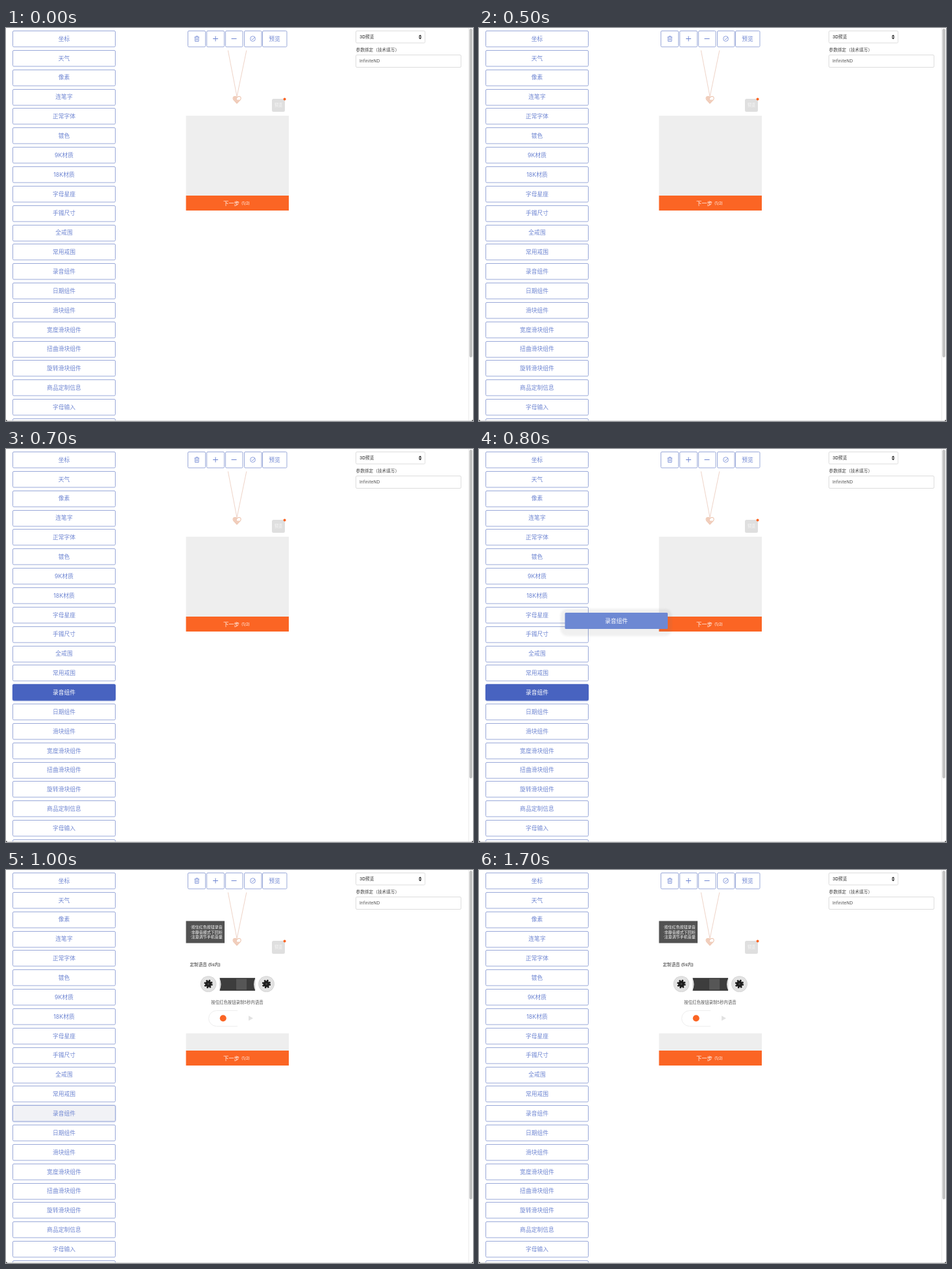
Recreate the animation shown at these times as an HTML page. Size 720x605 px, loop 2 s.

```html
<!DOCTYPE html>
<html lang="zh-CN">
<head>
<meta charset="utf-8">
<style>
  html, body { margin: 0; width: 100%; height: 100%; overflow: hidden; background: #fff; }
  svg { display: block; width: 720px; height: 605px; }
  text { font-family: Inter, "Noto Sans CJK SC", "Noto Sans CJK", sans-serif; }
</style>
</head>
<body>
<svg id="stage" viewBox="0 0 720 605" xmlns="http://www.w3.org/2000/svg"></svg>
<script>
const BLUE = '#6f86d2', BORDER = '#9aa9d9', ORANGE = '#fb6524';
const LABELS = ['坐标', '天气', '像素', '连笔字', '正常字体', '镀色', '9K材质', '18K材质', '字母星座',
  '手镯尺寸', '全戒围', '常用戒围', '录音组件', '日期组件', '滑块组件', '宽度滑块组件', '扭曲滑块组件',
  '旋转滑块组件', '商品定制信息', '字母输入', ''];
const PITCH = 29.85, ACTIVE = 12;

const rect = (x, y, w, h, fill, extra = '') =>
  `<rect x="${x}" y="${y}" width="${w}" height="${h}" fill="${fill}" ${extra}/>`;
const circle = (x, y, r, fill, extra = '') =>
  `<circle cx="${x}" cy="${y}" r="${r}" fill="${fill}" ${extra}/>`;
const path = (d, stroke, extra = '') =>
  `<path d="${d}" fill="none" stroke="${stroke}" ${extra}/>`;
// Text placed by the vertical centre of its line
const text = (s, x, cy, size, fill, anchor = 'middle', extra = '') =>
  `<text x="${x}" y="${cy + size * .37}" font-size="${size}" fill="${fill}" text-anchor="${anchor}" ${extra}>${s}</text>`;
const outlined = (x, y, w, h, stroke = BORDER, extra = '') =>
  rect(x, y, w, h, '#fff', `rx="1.5" stroke="${stroke}" ${extra}`);

function sidebar() {
  return LABELS.map((label, i) => {
    const y = 4.5 + i * PITCH, id = i === ACTIVE;
    return outlined(10.5, Math.floor(y) + .5, 158, 24.5, BORDER, id ? 'id="activeBox"' : '') +
      text(label, 89.5, y + 12, 8.8, BLUE, 'middle', id ? 'id="activeLabel"' : '');
  }).join('');
}

function toolbar() {
  const boxes = [[280.5, 27], [309.5, 27], [338.5, 26.5], [367.5, 26.5], [395.5, 37.5]];
  return boxes.map(([x, w]) => outlined(x, 4.5, w, 24.5)).join('') +
    path('M290.5 14H298M292.8 13.7V12.6H295.8V13.7M291.5 14V20.5H297V14M293.3 15.5V19M295.2 15.5V19', BLUE, 'stroke-width=".8"') +
    path('M319 16.5H327M323 12.5V20.5M347.5 16.5H355.5', BLUE) +
    circle(380.5, 16.5, 3.9, 'none', `stroke="${BLUE}" stroke-width=".8"`) +
    path('M378.7 16.5L380.2 18L383.8 14', BLUE, 'stroke-width=".8"') +
    text('预览', 414, 16.5, 8.8, BLUE);
}

function settings() {
  return outlined(539.5, 4.5, 106.5, 18.5, '#ddd') +
    text('3D预览', 545, 14, 6.7, '#333', 'start', 'font-weight="500"') +
    '<path d="M636 13.2L638.5 10.3L641 13.2ZM636 14.6L638.5 17.5L641 14.6Z" fill="#333"/>' +
    text('参数绑定（技术填写）', 539.5, 34, 6.7, '#444', 'start') +
    outlined(539.5, 41.5, 162, 19, '#ddd') +
    text('InfiniteND', 545, 51, 6.7, '#555', 'start');
}

function windowFrame() {
  return rect(713, 0, 1, 605, '#ececec') + rect(714.5, 1, 4.5, 506, '#c1c1c1', 'rx="2.2"') +
    rect(0, 604, 720, 1, '#ddd') + rect(0, 603.5, 1.5, 1.5, '#333') + rect(718.5, 603.5, 1.5, 1.5, '#333');
}

function necklace() {
  const heart = 'M356 116L350.6 110.3Q349 106.5 352 105.5Q355 105 356.2 107Q357.5 105 360.2 105.5Q363.2 106.5 361.6 110.3Z';
  return path('M342.3 34.5L356 105.5L370.8 34.5', '#eccfc1', 'stroke-width=".9"') +
    `<path d="${heart}" fill="#fff" stroke="#ecc3ad" stroke-width="1.1"/>` +
    '<path d="M350.3 109.5V106.5L353 105.3L356 107V110.5H361L356 115.8Z" fill="#f1cdbb"/>';
}

const badge = () => rect(410, 109, 20, 20, '#dfdfdf', 'rx="2.5"') +
  text('预览', 420, 119, 6.3, '#f7f7f7') + circle(429.6, 109.4, 2, ORANGE);

const nextBar = y => rect(277.5, y, 158.5, 23, ORANGE) +
  text('下一步', 335, y + 11.5, 8.3, '#fff', 'start') +
  text('(1/2)', 363, y + 11.8, 6.1, '#fff', 'start');

const reel = x => circle(x, 175.5, 12.3, 'url(#metal)') +
  circle(x, 175.5, 8.4, '#e9e9e9') + circle(x, 175.5, 5, '#1d1d1d') +
  circle(x, 175.5, 5.6, 'none', 'stroke="#1d1d1d" stroke-width="2.2" stroke-dasharray="2.4 2"') +
  circle(x, 175.5, 1.4, '#444');

function recorder() {
  const tips = ['·按住红色按钮录音', '·非静音模式下回听', '·注意调节手机音量'];
  return rect(277.5, 78.5, 59.5, 34, '#525252') +
    tips.map((s, i) => text(s, 284, 88 + i * 7.4, 6, '#fff', 'start')).join('') +
    text('定制语音 (5s内)', 283.5, 146, 6.6, '#333', 'start', 'font-weight="500"') +
    reel(312) + reel(401.5) +
    rect(329.5, 166.5, 54.5, 19, '#3d3d3d') + rect(355, 167.5, 16, 17, '#565656') +
    path('M329.5 166.8H384M329.5 185.2H384', '#222', 'stroke-width=".8"') +
    '<path d="M329 166Q334 176 329 186ZM384.5 166Q379.5 176 384.5 186Z" fill="#ddd"/>' +
    text('按住红色按钮录制5秒内语音', 356.5, 203.7, 6.4, '#555') +
    path('M357 216.5H324.5A12 12 0 0 0 324.5 240.5H357', '#eee') +
    circle(334.7, 228.3, 5, ORANGE) +
    '<path d="M374 224.3L381 228.2L374 232Z" fill="#e2e2e2"/>' +
    rect(277.5, 251.5, 158.5, 27, '#eee') + nextBar(278);
}

const ghost = () => rect(-7, -6, 172, 42, '#777', 'rx="11" opacity=".1" filter="url(#soft)"') +
  rect(0, 0, 158.5, 25, '#6d88d3', 'rx="1.5"') + text('录音组件', 79.3, 12.5, 8.8, '#fff');

stage.innerHTML = `<defs>
  <radialGradient id="metal"><stop offset=".6" stop-color="#d8d8d8"/><stop offset=".85" stop-color="#e6e6e6"/><stop offset="1" stop-color="#cfcfcf"/></radialGradient>
  <filter id="soft"><feGaussianBlur stdDeviation="1.5"/></filter></defs>` +
  sidebar() + toolbar() + settings() + windowFrame() +
  `<g id="emptyView">${rect(277.5, 135, 158.5, 123)}${nextBar(258)}</g>`.replace('undefined', '#eee') +
  `<g id="recordView">${recorder()}</g>` + necklace() + badge() +
  `<g id="dragged">${ghost()}</g>`;

const el = id => document.getElementById(id);
const show = (id, on) => el(id).setAttribute('display', on ? 'inline' : 'none');

function boxStyle(t) {
  if (t < 600) return ['#fff', 'none'];
  if (t < 700) return ['#f5f6fc', 'none'];
  if (t < 1000) return ['#4863c0', 'drop-shadow(0 0 1px #4863c088)'];
  if (t < 1300) return ['#f1f2f6', 'drop-shadow(0 0 1.2px #6f86d299)'];
  if (t < 1500) return ['#f5f6fc', 'drop-shadow(0 0 1.2px #6f86d299)'];
  return ['#fff', 'none'];
}

function render(now) {
  const t = Math.floor(now % 2000 / 100) * 100;
  const [fill, glow] = boxStyle(t), pressed = t >= 700 && t < 1000;
  el('activeBox').setAttribute('fill', fill);
  el('activeBox').style.filter = glow;
  el('activeBox').setAttribute('stroke', pressed ? fill : BORDER);
  el('activeLabel').setAttribute('fill', pressed ? '#fff' : BLUE);
  show('emptyView', t < 1000);
  show('recordView', t >= 1000);
  show('dragged', t >= 800 && t < 1000);
  const k = (t - 700) / 200;
  el('dragged').setAttribute('transform', `translate(${10 + 245 * k} ${362.5 - 221 * k})`);
}

function loop() {
  render(performance.now());
  requestAnimationFrame(loop);
}
loop();
</script>
</body>
</html>
```
